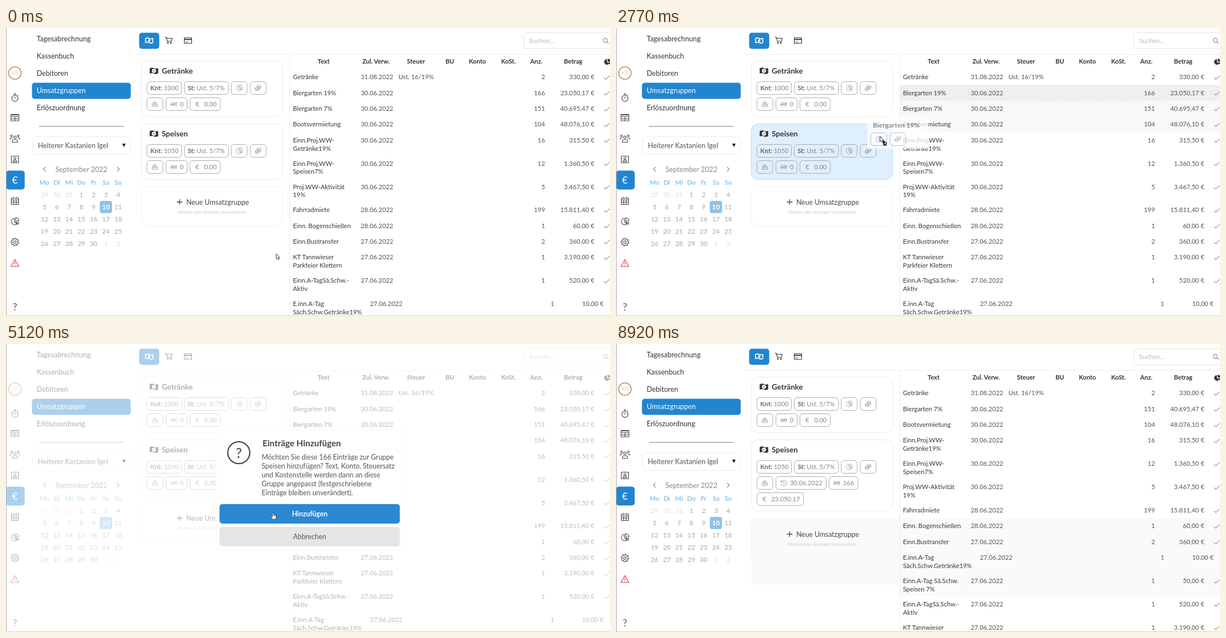
These frames come from a looping animation (1082x518 px, 9.52 s). An HTML page:

```html
<!DOCTYPE html>
<html lang="de">
<head>
<meta charset="utf-8">
<title>Umsatzgruppen</title>
<style>
html, body { margin: 0; height: 100%; overflow: hidden; background: #fff; }
svg { display: block; width: 100%; height: 100%; font-family: Lato, "Open Sans", sans-serif; }
text { white-space: pre; }
</style>
</head>
<body>
<svg id="stage" viewBox="0 0 1082 518"></svg>
<script>
const LOOP = 9520, BLUE = '#2185d0';

// ---------- drawing helpers ----------
const text = (x, y, s, size = 11.4, fill = '#555', weight = 400, anchor = 'start') =>
  `<text x="${x}" y="${y + size * .36}" font-size="${size}" fill="${fill}" font-weight="${weight}" text-anchor="${anchor}">${s}</text>`;
const mid = (x, y, s, size, fill, weight) => text(x, y, s, size, fill, weight, 'middle');
const end = (x, y, s) => text(x, y, s, 11.4, '#555', 400, 'end');
const box = (x, y, w, h, r, fill, stroke = 'none', more = '') =>
  `<rect x="${x}" y="${y}" width="${w}" height="${h}" rx="${r}" fill="${fill}" stroke="${stroke}" ${more}/>`;
const line = (d, stroke, w = 1) => `<path d="${d}" fill="none" stroke="${stroke}" stroke-width="${w}"/>`;
const ring = (x, y, r) => `M${x + r} ${y}a${r} ${r} 0 1 1 ${-2 * r} 0a${r} ${r} 0 1 1 ${2 * r} 0`;

const gear = 'M' + Array.from({ length: 32 }, (_, i) => {
  const a = (i + .5) * Math.PI / 16, r = i % 4 < 2 ? 7 : 5.2;
  return (r * Math.cos(a)).toFixed(1) + ' ' + (r * Math.sin(a)).toFixed(1);
}).join('L') + 'z' + ring(0, 0, 2.3);

const ICONS = {
  watch: ring(0, 1.5, 5.6) + 'M0-7v3M-2-7h4M0-1.5v3.5M4.3-3.8l1.3-1.3',
  table: 'M-7-6h14v11.5h-14zM-7-5h14M-7-2h14M-7 2h14M0-2v7.5',
  users: ring(0, -2.5, 2.2) + ring(-6, -5, 1.7) + ring(6, -5, 1.7) +
    'M-4.5 6.5v-2.5q0-2 2-2h5q2 0 2 2v2.5zM-8.5 2v-1.5q0-1.7 1.7-1.7h2.3M8.5 2v-1.5q0-1.7-1.7-1.7h-2.3',
  person: 'M-6.5-6h13v12h-13z' + ring(0, -1.8, 1.9) + 'M-3.5 4q0-2.5 2.5-2.5h2q2.5 0 2.5 2.5z',
  calendar: 'M-6.5-5h13v11.5h-13zM-6.5-2h13M-6.5 2h13M-2.2-2v8.5M2.2-2v8.5M-3-7.2v3M3-7.2v3',
  pie: 'M-1-6a6 6 0 1 0 4.5 10.5l-4.5-4.5zM1.5-7a6 6 0 0 1 5.5 6h-5.5zM1.5 1.5h5.5q0 2-1.5 3.5z',
  gear,
  warn: 'M0-6.5L7 6h-14zM0-2.2v4M0 3.4v1.2',
  cart: 'M-7-5.5h2.6l2 7.5h7l1.7-5.5h-10M-1.5 3v2M4 3v2' + ring(-1.5, 5, .8) + ring(4, 5, .8),
  card: 'M-6.5-5h13v10h-13zM-6.5-2.5h13M-6.5-1.5h13M-4 2.5h4',
  money: 'M-6.5-3.8q3.2-1.6 6.5 0t6.5 0v7.6q-3.2 1.6-6.5 0t-6.5 0z',
  dot: ring(0, 0, 1.4),
  coins: 'M-2-4.5a4 1.7 0 1 0 8 0a4 1.7 0 1 0-8 0v5M6-4.5v5.5q-1 1.5-4 1.5M6-1.7q-1.5 1.7-5 1.5' +
    'M-6.5 0a4 1.7 0 1 0 8 0a4 1.7 0 1 0-8 0v4q1 1.8 4 1.8t4-1.8v-4M-6.5 2.2q1 1.8 4 1.8t4-1.8',
  register: 'M-6 5.5v-4l1.6-3.5h8.8l1.6 3.5v4zM-6 2h12M-3-2v-3h4.5v3M-2.5 0h5',
  tally: 'M-4.5-4v8M-1.5-4v8M1.5-4v8M4.5-4v8M-6.5 1l13-2',
  history: 'M-5-2a5.3 5.3 0 1 1 0 4.2M-5.5-5v3.2h3.2M0-2.5v3l2 1.3',
  check: 'M-4.5 .5l3 3 6.5-6.5',
  lens: ring(-1, -1, 3.6) + 'M1.7 1.7l3.5 3.5',
  left: 'M2-4l-4 4 4 4', right: 'M-2-4l4 4-4 4', plus: 'M0-5v10M-5 0h10'
};
const icon = (name, x, y, stroke = '#444', w = 1.1, k = 1, fill = 'none') =>
  `<path d="${ICONS[name]}" transform="translate(${x} ${y}) scale(${k})" fill="${fill}" stroke="${stroke}" stroke-width="${w}" stroke-linejoin="round"/>`;

// ---------- left column ----------
function sidebar() {
  let s = line(ring(16, 81, 11.2), '#b87a4a', 1.3) + mid(16, 81, 'KB', 9.5, '#e3cdbb');
  s += box(0, 256.5, 33.5, 34, 5, BLUE) + mid(16, 274, '€', 18, '#fff');
  [['watch', 125], ['table', 161.5], ['users', 199], ['person', 236.5], ['calendar', 311], ['pie', 348], ['gear', 385]]
    .forEach(([n, y]) => s += icon(n, 16, y));
  s += icon('warn', 16, 423, '#dc3545', 1.2) + mid(16, 502, '?', 18, '#555');

  s += box(46.5, 98.5, 177, 29, 5, BLUE);
  ['Tagesabrechnung', 'Kassenbuch', 'Debitoren', 'Umsatzgruppen', 'Erlöszuordnung']
    .forEach((n, i) => s += text(55, 19 + i * 31.2, n, 12.7, i == 3 ? '#fff' : '#333'));
  s += line('M59 177h152', '#777') + box(47.5, 195.5, 175, 32, 6, '#fff', '#ececec');
  s += text(57, 211.5, 'Heiterer Kastanien Igel', 12.6, '#555') + '<path d="M208 208h6.4l-3.2 6z" fill="#222"/>';

  s += icon('left', 69, 254, '#888') + icon('right', 201, 254, '#888') + mid(135, 254.5, 'September 2022', 12.7, '#888');
  ['Mo', 'Di', 'Mi', 'Do', 'Fr', 'Sa', 'So'].forEach((d, i) => s += mid(69 + i * 22, 278, d, 11.6, '#8fc1e7', 700));
  s += box(168, 311, 22, 22, 4, '#90c2e8');
  for (let i = 0; i < 35; i++) {
    const out = i < 3 || i > 32, day = i < 3 ? 29 + i : (i - 3) % 30 + 1, on = i == 12;
    s += mid(69 + i % 7 * 22, 300 + (i / 7 | 0) * 22, day, on ? 12.2 : 11.6, on ? '#fff' : out ? '#ddd' : '#a6a6a6', on ? 700 : 400);
  }
  return s;
}

// ---------- right side ----------
function toolbar() {
  return box(238.5, 8.5, 36, 29, 5, BLUE) + icon('money', 256.5, 22.5, '#fff', 1.6) + icon('dot', 256.5, 22.5, '#fff', 1.6) +
    icon('cart', 291.5, 22, '#333') + icon('card', 326, 22.5, '#333', 1.2) +
    box(927.5, 8.5, 170, 29, 5, '#fff', '#e4e4e4') + text(937, 23, 'Suchen...', 11.6, '#bbb') + icon('lens', 1074.5, 23, '#888') +
    line('M230 47.5h852M508.5 47v471', '#ececec');
}

const pill = (x, y, w, inner) => box(x + .5, y, w, 23, 5, 'none', '#aaa') + inner;
const pillIcon = (x, y, name) => pill(x, y, 28.5, icon(name, x + 14.7, y + 11.5, '#888', .9, .8));
const pillText = (x, y, w, label, value) =>
  pill(x, y, w, `<text x="${x + 6.5}" y="${y + 15.5}" font-size="11.4" fill="#888"><tspan font-weight="700" fill="#666">${label}</tspan> ${value}</text>`);
const pillValue = (x, y, w, name, value) =>
  pill(x, y, w, icon(name, x + 14.5, y + 11.5, '#888', .9, .95) + text(x + 25.5, y + 11.5, value, 11.4, '#888'));
const pillEuro = (x, y, w, value) =>
  pill(x, y, w, text(x + 10.5, y + 11.5, '€', 11.4, '#888') + text(x + 26, y + 11.5, value, 11.4, '#888'));

function card(y, name, account, h, id, filled) {
  const [r1, r2, r3] = [37.5, 66.5, 95.5].map(d => y + d);
  let s = box(242.5, y + .5, 253, h, 12, '#fff', '#ebebeb', `id="${id}"`);
  s += icon('money', 265, y + 18, '#333', 2.2, 1, '#333') + icon('dot', 265, y + 18, '#fff', 1.5, 1.7, '#333');
  s += text(279, y + 18.5, name, 13.6, '#383838', 700);
  s += pillText(252, r1, 62, 'Knt:', account) + pillText(319, r1, 79, 'St:', 'Ust. 5/7%');
  s += pillIcon(403, r1, 'pie') + pillIcon(437, r1, 'coins') + pillIcon(252, r2, 'register');
  return s + (filled
    ? pillValue(286, r2, 90, 'history', '30.06.2022') + pillValue(381, r2, 52, 'tally', '166') + pillEuro(252, r3, 83.5, '23.050,17')
    : pillValue(286, r2, 38, 'tally', '0') + pillEuro(329, r2, 54.5, '0,00'));
}
const newGroup = (y, id) => box(242.5, y + .5, 253, 71, 12, '#fff', '#f3f3f3', `id="${id}"`) +
  icon('plus', 311, y + 28, '#444', 1.3) + text(323, y + 28, 'Neue Umsatzgruppe', 12.5, '#484848') +
  mid(369, y + 46, 'Klicken oder Einträge hineinziehen', 8.1, '#c6c6c6');

// text (~ breaks the line) | date | count | amount | tax
const ROWS = `Getränke|31.08.2022|2|330,00|Ust. 16/19%
Biergarten 19%|30.06.2022|166|23.050,17
Biergarten 7%|30.06.2022|151|40.695,47
Bootsvermietung|30.06.2022|104|48.076,10
Einn.Proj.WW-~Getränke19%|30.06.2022|16|315,50
Einn.Proj.WW-~Speisen7%|30.06.2022|12|1.360,50
Proj.WW-Aktivität~19%|30.06.2022|5|3.467,50
Fahrradmiete|28.06.2022|199|15.811,40
Einn. Bogenschießen|28.06.2022|1|60,00
Einn.Bustransfer|27.06.2022|2|360,00
KT Tannwieser~Parkfeier Klettern|27.06.2022|1|3.190,00
Einn.A-TagSä.Schw.-~Aktiv|27.06.2022|1|520,00
E.inn.A-Tag~Säch.Schw.Getränke19%|27.06.2022|1|10,00
Einn.A-Tag Sä.Schw.~Speisen 7%|27.06.2022|1|50,00`.split('\n').map(r => r.split('|'));

function layout(order) {
  let y = 74;
  return order.map(i => {
    const h = ROWS[i][0].includes('~') ? 41.9 : 28.35, row = { i, y, h };
    y += h;
    return row;
  });
}
const before = layout([...Array(13).keys()]);
const after = layout([0, 2, 3, 4, 5, 6, 7, 8, 9, 12, 13, 11, 10]);

const tableRows = rows => rows.map(({ i, y }) => {
  const [name, date, count, sum, tax = ''] = ROWS[i], c = y + 14.2, dx = i == 12 ? 16.5 : 0;
  return name.split('~').map((n, k) => text(514, c + k * 14.8, n, 11.4, '#383838')).join('') +
    text(635.5 + dx, c, date) + text(703, c, tax) + end(965.5 + dx, c, count) + end(1054 + dx, c, sum + ' €') +
    icon('check', 1076 + dx, c + .8, '#555', 1);
}).join('');

const tableHead = () => [['Text', 569], ['Zul. Verw.', 663], ['Steuer', 734.5], ['BU', 795], ['Konto', 844.5], ['KoSt.', 900], ['Anz.', 950], ['Betrag', 1016]]
  .map(([n, x]) => mid(x, 60, n, 11.2, '#333', 700)).join('') + icon('pie', 1077, 61, '#333', .8, .8, '#333');

// ---------- floating parts ----------
const modal = () => box(376, 154, 336, 217, 8, '#fff', '#f6f6f6') +
  line(ring(417, 195.5, 19.7), '#444', 2.2) + mid(417, 195.5, '?', 25, '#444') +
  text(459.5, 178.5, 'Einträge Hinzufügen', 15.5, '#444', 700) +
  ['Möchten Sie diese 166 Einträge zur Gruppe', 'Speisen hinzufügen? Text, Konto, Steuersatz', 'und Kostenstelle werden dann an diese',
    'Gruppe angepasst (festgeschriebene', 'Einträge bleiben unverändert).'].map((l, i) => text(458, 204 + i * 16, l, 12.4, '#555')).join('') +
  box(382.5, 288, 323, 35, 5, '#2b88d2') + mid(544, 305.5, 'Hinzufügen', 12.4, '#fff', 700) +
  box(382.5, 329, 323, 35, 5, '#e5e5e5') + mid(544, 346.5, 'Abbrechen', 12.4, '#555');

const ghost = () => box(0, 0, 110, 57, 3, '#fff') + text(10, 14.5, 'Biergarten 19%', 12.2, '#666', 700) +
  pillIcon(6, 28.5, 'pie') + pillIcon(40, 28.5, 'coins');

const shape = (id, d, more = '') => `<g id="${id}"><path d="${d}" fill="#fff" stroke="#333" stroke-width=".9" stroke-linejoin="round"/>${more}</g>`;
const ARROW = 'M0 0v9.5l2.2-2 1.6 3.4 1.5-.7-1.6-3.3h3z';
const cursors = () => shape('arrow', ARROW) +
  shape('drag', ARROW, '<path d="M5 8h4v2.5h3v6h-6v-3h-1z" fill="#222"/><path d="M7 12.5h3.5v2.5" stroke="#fff" fill="none"/>') +
  shape('point', 'M-1.2 6.5v-5q0-1.2 1.2-1.2t1.2 1.2v3q4 .2 4.3 1.7v2.5l-1 3h-5.5l-3-4q.5-2 2.8-.2z') +
  shape('grab', 'M-3 5.5l-3-5q.8-1.5 2.5.5l-1-4q.8-1.4 1.8 0l1 2.5-.2-4q1-1.3 1.8 0l.5 4 .9-3.5q1-1 1.6.2l-.4 4 1.2-2.5q1.2-.5 1.3.6l-1.5 6.2z');

const $ = id => document.getElementById(id);
$('stage').innerHTML =
  box(0, 0, 1082, 518, 0, '#fff') +
  `<g id="tintUp">${box(509, before[2].y, 573, 56.7, 0, '#f8f8f8')}</g>` +
  `<g id="tintDown">${box(242, 314, 266, 119, 0, '#fafafa')}${box(509, after[7].y, 573, after[11].y - after[7].y, 0, '#fafafa')}</g>` +
  '<path id="hover" fill="#efefef"/><path id="cells" fill="none" stroke="#e7e7e7"/>' +
  sidebar() + toolbar() + tableHead() + card(59, 'Getränke', 1000, 100, 'drinks') +
  `<g id="old">${card(172, 'Speisen', 1050, 100, 'food')}${newGroup(285, 'addOld')}${tableRows(before)}</g>` +
  `<g id="new">${card(172, 'Speisen', 1050, 128, 'foodNew', true)}${newGroup(314, 'addNew')}${tableRows(after)}</g>` +
  box(230, 0, 852, 518, 0, '#fff', 'none', 'id="loading"') + box(0, 0, 1082, 518, 0, '#fff', 'none', 'id="veil"') +
  `<g id="modal">${modal()}</g><path id="spinner" fill="none" stroke="${BLUE}" stroke-width="3.5"/>` +
  `<g id="ghost" opacity=".75">${ghost()}</g><g id="cursor">${cursors()}</g>` +
  line('M.5 0v518', '#aaa') + line('M0 517.5h1082', '#d0d0d0');

// ---------- motion: [time, values...] ----------
const MOUSE = [[400, 484, 406], [560, 486, 375], [850, 490, 300], [1080, 555, 180], [1240, 598, 77], [1370, 598, 80],
  [1690, 567, 116], [2460, 567, 116], [2540, 544, 150], [2770, 473, 195], [2820, 473, 195], [3180, 428.5, 246.5],
  [4210, 428.5, 246.5], [4450, 440, 259], [4850, 468, 292], [5120, 478.5, 303.5], [8200, 478.5, 303.5], [8530, 560, 482], [8770, 560, 482], [8920, 572, 532]];
const POPUP = [[3330, .7, 0], [3465, 1.04, 1], [3570, .97, 1], [3660, 1, 1], [6130, 1, 1], [6220, .944, .72], [6330, .944, .72], [6430, .85, 0]];
const VEIL = [[3330, 0], [3450, .62], [6130, .62], [6220, .47], [6330, .47], [6430, 0]];
const LOADING = [[6130, 0], [6220, .55], [6330, .55], [6430, .68], [7390, .68]];
const ARC = [[6150, 15], [6220, 25], [6330, 25], [6800, 300], [7390, 300]];

function at(keys, t) {
  const i = keys.findIndex(k => k[0] > t);
  if (i < 1) return keys.at(i).slice(1);
  const a = keys[i - 1], b = keys[i], p = (t - a[0]) / (b[0] - a[0]);
  return a.slice(1).map((v, k) => v + (b[k + 1] - v) * p);
}
const show = (id, on) => $(id).style.display = on ? '' : 'none';
const within = (t, a, b) => t >= a && t < b;

function draw(t) {
  const [x, y] = at(MOUSE, t), done = t >= 7390, dragging = within(t, 2460, 3180);
  const dialog = within(t, 3330, 6430);
  show('old', !done);
  show('new', done);
  show('tintUp', within(t, 1150, 3330));
  show('tintDown', t >= 8530);

  const inTable = x > 509 && within(y, 74, 518);
  const row = dragging ? before[1] : inTable ? (done ? after : before).find(r => within(y, r.y, r.y + r.h)) : null;
  show('hover', row);
  show('cells', row);
  if (row) {
    $('hover').setAttribute('d', `M509 ${row.y}h573v${row.h}h-573z`);
    $('cells').setAttribute('d', [632, 696, 773, 816, 872, 914, 971, 1064].map(c => `M${c}.5 ${row.y}v${row.h}`).join(''));
  }

  const overFood = dragging && x < 495;
  $('food').setAttribute('fill', overFood ? '#dfeffd' : '#fff');
  $('food').setAttribute('stroke', overFood ? '#b5d8f4' : '#ebebeb');
  const overAdd = top => !dialog && x < 495 && within(y, top, top + 72);
  $('addOld').setAttribute('fill', overAdd(285) ? '#f8f8f8' : '#fff');
  $('addNew').setAttribute('fill', t >= 8530 ? '#fafafa' : overAdd(314) ? '#f8f8f8' : '#fff');

  $('loading').setAttribute('opacity', done ? 0 : at(LOADING, t)[0]);
  $('veil').setAttribute('opacity', at(VEIL, t)[0]);
  const [scale, alpha] = at(POPUP, t);
  $('modal').setAttribute('opacity', alpha);
  $('modal').setAttribute('transform', `translate(544 262.5) scale(${scale}) translate(-544 -262.5)`);

  const spinning = within(t, 6150, 7390);
  show('spinner', spinning);
  if (spinning) {
    const len = at(ARC, t)[0], from = 38 + (Math.min(t, 7200) - 6220) * .6245;
    const point = deg => `${663 + 14.7 * Math.cos(deg * Math.PI / 180)} ${263 + 14.7 * Math.sin(deg * Math.PI / 180)}`;
    $('spinner').setAttribute('d', `M${point(from)}A14.7 14.7 0 ${len > 180 ? 1 : 0} 1 ${point(from + len)}`);
  }

  show('ghost', dragging);
  $('ghost').setAttribute('transform', `translate(${x - 23} ${y - 35})`);
  $('cursor').setAttribute('transform', `translate(${x} ${y})`);
  const kind = dragging ? 'drag' : dialog ? (y > 288 ? 'point' : 'arrow') : inTable ? 'grab' : 'arrow';
  ['arrow', 'drag', 'point', 'grab'].forEach(k => show(k, k == kind));
}

function frame() {
  draw(performance.now() % LOOP);
  requestAnimationFrame(frame);
}
frame();
</script>
</body>
</html>
```
